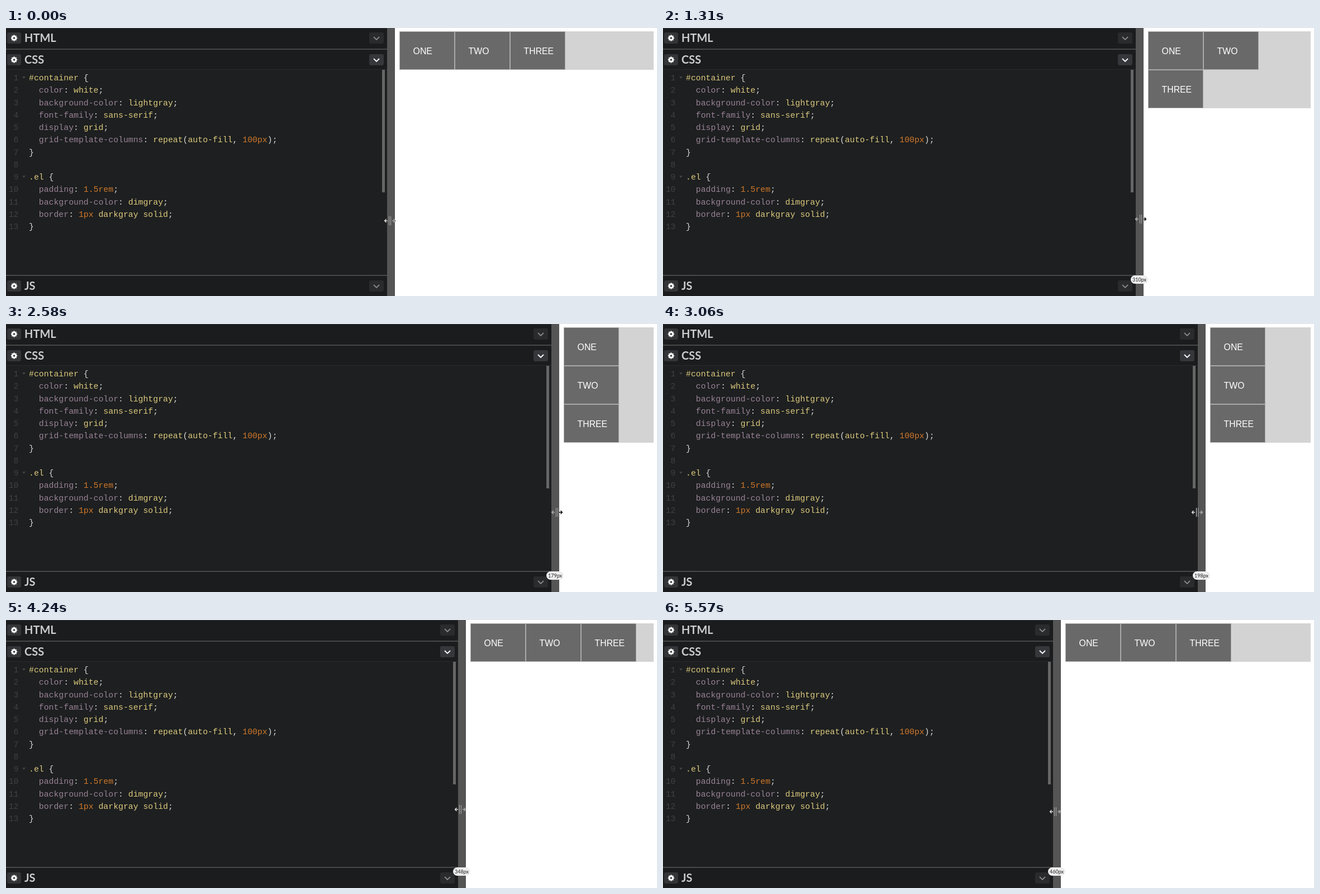
Write an HTML page that moves like this. It is 1165 px wide and 481 px high and loops after 5660 ms.

```html
<!DOCTYPE html>
<html lang="en">
<head>
<meta charset="utf-8">
<title>Grid auto-fill</title>
<style>
  html, body { margin: 0; width: 100%; height: 100%; overflow: hidden; background: #fff; }
  svg { display: block; }
  text { white-space: pre; }
  .title { font: bold 20px Lato, sans-serif; fill: #ccc; }
  .code { font: 14.82px "Courier New", "Liberation Mono", monospace; fill: #ddca7e; }
  .num { fill: #3f4142; text-anchor: end; }
  .prop { fill: #9a8297; }
  .val { fill: #d0782a; }
  .punct { fill: #d8d8d8; }
  .cell text { font: 15.8px "Liberation Sans", Arial, sans-serif; fill: #fff; }
  #badge text { font: 9px Lato, sans-serif; fill: #222; text-anchor: middle; }
  #cursor { mix-blend-mode: difference; fill: none; stroke: #fff; }
</style>
</head>
<body>
<svg width="1165" height="481" viewBox="0 0 1165 481">
  <rect width="1165" height="481" fill="#1d1f20"/>
  <g id="editor"></g>
  <g id="pane">
    <g id="arrows"></g>
    <rect x="-9" y="75" width="5" height="220" fill="#666"/>
    <rect width="14" height="481" fill="#555"/>
    <rect x="14" width="700" height="481" fill="#fff"/>
    <g transform="translate(22 6)">
      <rect id="box" fill="#d3d3d3"/>
      <g id="cells"></g>
    </g>
    <g id="badge">
      <rect x="-9" y="444" width="31" height="15" rx="7.5" fill="#eee"/>
      <text x="6.5" y="455"></text>
    </g>
  </g>
  <g id="cursor">
    <path d="M-1.5-8V8M1.5-8V8"/>
    <path d="M-4 0H-9.5M-6.5-3L-9.5 0L-6.5 3M4 0H9.5M6.5-3L9.5 0L6.5 3" stroke-width="1.3"/>
  </g>
</svg>
<script>
const $ = id => document.getElementById(id);
const LOOP = 5660, STEP = 40;
const SCALE = 0.988, COL = 100 * SCALE, ROW = 69;
const PAGE_RIGHT = 1166.7, BOX_RIGHT = 1159;

const css = `#container {
  color: white;
  background-color: lightgray;
  font-family: sans-serif;
  display: grid;
  grid-template-columns: repeat(auto-fill, 100px);
}

.el {
  padding: 1.5rem;
  background-color: dimgray;
  border: 1px darkgray solid;
}`;

// [time, left edge of the divider]
const edgeKeys = [
  [0, 682], [600, 768], [730, 787], [1160, 833], [1760, 897], [1850, 903],
  [2340, 952], [2580, 976], [2709, 976], [2710, 981], [2930, 972], [3530, 896],
  [4100, 835], [4240, 809], [4710, 791], [5290, 733], [5570, 698], [LOOP, 698]
];
// [time, cursor x relative to the divider, cursor y]
const cursorKeys = [
  [0, 4.5, 346], [730, 8, 346], [1850, 9, 339], [2580, 9.5, 338], [2709, 9.5, 338],
  [2930, 0, 338], [3530, -3, 338], [4240, 4, 340], [5570, 4, 344], [LOOP, 4, 344]
];

// Value of one column at time t, advancing in steps after each key
function sample(keys, t, col = 1) {
  const i = keys.findIndex(k => k[0] > t);
  const a = keys[i - 1], b = keys[i];
  const passed = Math.floor((t - a[0]) / STEP) * STEP;
  return a[col] + (b[col] - a[col]) * passed / (b[0] - a[0]);
}

function highlight(line) {
  return line.trim().replace(/^[\w-]+(?=:)|\d[\w.]*|[:;(){},]/g, (s, at) => {
    const kind = /^\d/.test(s) ? "val" : at === 0 && /^\w/.test(s) ? "prop" : "punct";
    return `<tspan class="${kind}">${s}</tspan>`;
  });
}

function gear(x, y) {
  let teeth = "";
  for (let a = 0; a < 360; a += 45)
    teeth += `<rect x="-1.2" y="-5.6" width="2.4" height="3" fill="#fff" transform="rotate(${a})"/>`;
  return `<g transform="translate(${x} ${y})">
    <rect x="-12.5" y="-10" width="25" height="20" rx="3" fill="#343538"/>
    ${teeth}<circle r="3" fill="none" stroke="#fff" stroke-width="2.6"/></g>`;
}

function header(name, top, height, y) {
  $("arrows").innerHTML += `<g transform="translate(-19 ${y})">
    <rect x="-13" y="-10" width="26" height="20" rx="3" fill="${name === "CSS" ? "#36373a" : "#2a2b2d"}"/>
    <path d="M-5-2L0 3L5-2" fill="none" stroke="${name === "CSS" ? "#fff" : "#888"}" stroke-width="1.8"/></g>`;
  return `<rect y="${top}" width="1165" height="${height}" fill="#1a1c1d"/>
    ${gear(14.5, y)}<text class="title" x="33" y="${y + 7}">${name}</text>`;
}

function bar(y, height, color) {
  return `<rect y="${y}" width="1165" height="${height}" fill="${color}"/>`;
}

const lines = css.split("\n").map((line, i) => {
  const y = 94 + i * 22.25;
  const x = line.startsWith(" ") ? 58.8 : 41;
  const fold = line.endsWith("{") ? `<path d="M29 ${y - 7}h6l-3 4z" fill="#444"/>` : "";
  return `<text class="code num" x="22.5" y="${y}">${i + 1}</text>${fold}
    <text class="code" x="${x}" y="${y}">${highlight(line)}</text>`;
});

$("editor").innerHTML = header("HTML", 0, 37, 18) + header("CSS", 39, 36, 57) +
  header("JS", 445, 36, 463) + bar(0, 1, "#333") + bar(37, 2, "#484848") +
  bar(74, 1, "#292b2c") + bar(443, 2, "#484848") + lines.join("");

$("cells").innerHTML = ["ONE", "TWO", "THREE"].map(word => `<g class="cell">
  <rect x=".5" y=".5" width="98" height="68" fill="#696969" stroke="#a9a9a9"/>
  <text x="24.6" y="40.5">${word}</text></g>`).join("");
const cells = [...$("cells").children];

function draw(now) {
  const t = now % LOOP;
  const edge = Math.round(sample(edgeKeys, t));
  const boxWidth = BOX_RIGHT - edge - 22;
  const cols = Math.min(3, Math.floor(boxWidth / COL));

  $("pane").setAttribute("transform", `translate(${edge} 0)`);
  $("box").setAttribute("width", boxWidth);
  $("box").setAttribute("height", Math.ceil(3 / cols) * ROW);
  cells.forEach((cell, i) => {
    const x = Math.round(i % cols * COL), y = Math.floor(i / cols) * ROW;
    cell.setAttribute("transform", `translate(${x} ${y})`);
  });

  $("badge").style.display = t < STEP ? "none" : "";
  $("badge").lastElementChild.textContent =
    Math.round((PAGE_RIGHT - edge - 14) / SCALE) + "px";

  const cx = Math.round(edge + sample(cursorKeys, t));
  const cy = Math.round(sample(cursorKeys, t, 2));
  $("cursor").setAttribute("transform", `translate(${cx} ${cy})`);
}

const start = performance.now();
function tick() {
  draw(performance.now() - start);
  requestAnimationFrame(tick);
}
tick();
</script>
</body>
</html>
```
